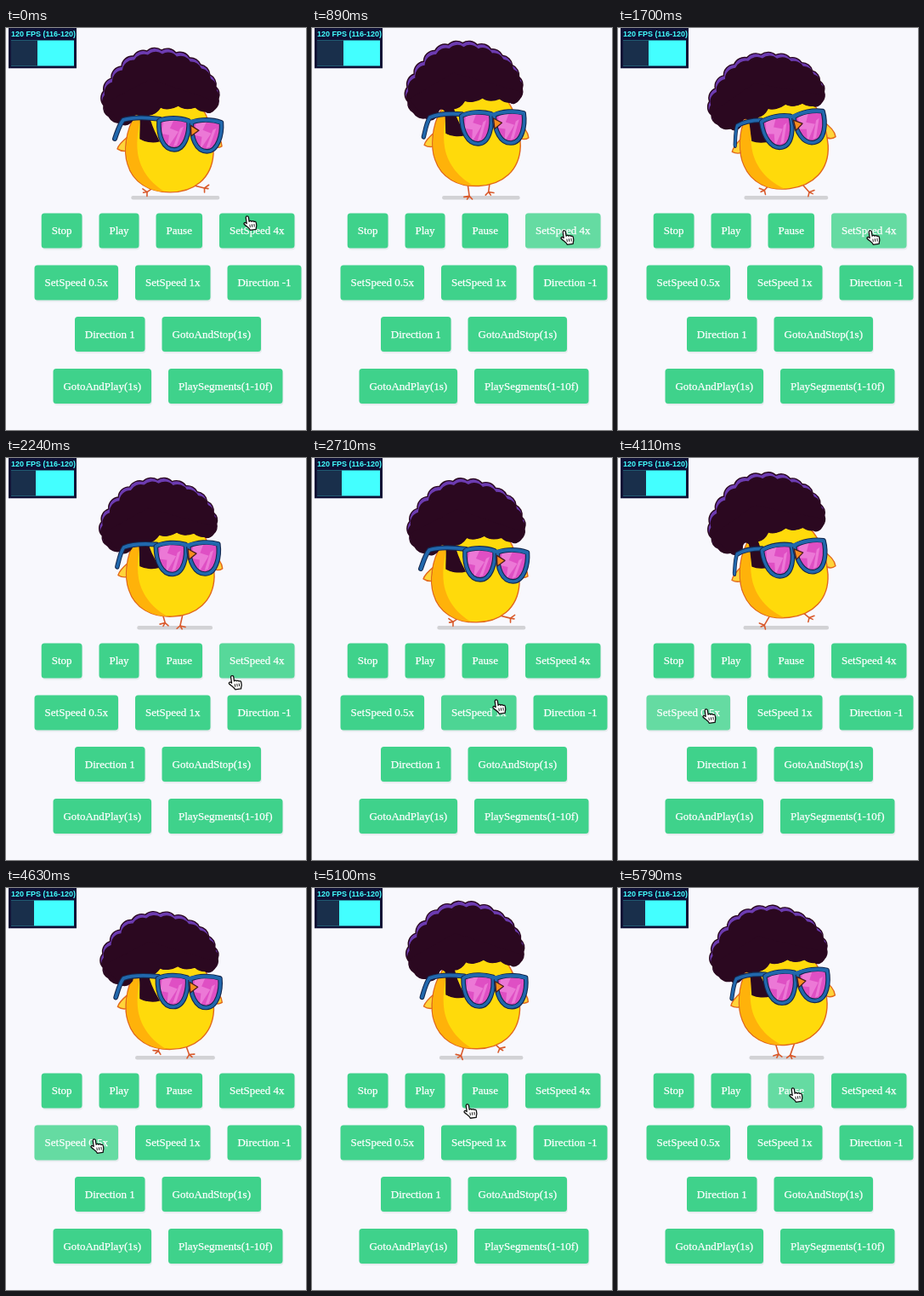
Write an HTML page that moves like this. It is 353x472 px and loops after 5.81 s.

```html
<!DOCTYPE html>
<html lang="en">
<head>
<meta charset="utf-8">
<title>Dancing chick player</title>
<style>
  html, body { margin: 0; width: 100%; height: 100%; overflow: hidden; background: #f8f8fd; }
  svg { display: block; }
  .button { font: 13px "Liberation Serif", "Times New Roman", serif; text-anchor: middle; fill: #fff; stroke: #fff; stroke-width: .25; }
  .fps { font: bold 9px "Liberation Sans", Arial, sans-serif; fill: #43ffff; }
  .skin { stroke: #e2681c; stroke-width: 1.4; stroke-linejoin: round; }
  .leg { fill: none; stroke: #d95a2c; stroke-width: 1.6; stroke-linecap: round; stroke-linejoin: round; }
  .rim { fill: none; stroke-linecap: round; stroke-linejoin: round; }
  .dark { stroke: #14284f; }
  .blue { stroke: #2168ad; }
</style>
</head>
<body>
<svg width="353" height="472" viewBox="0 0 353 472">
  <defs>
    <path id="lens" d="M180 109C190 105 204 105 215 109C216 123 211 143 198 143C185 143 179 127 180 109Z"/>
    <path id="armShape" d="M181 107C166 105 151 104 138 108C133 114 131 122 128 130"/>
    <path id="brow" d="M182 108C192 105 207 106 216 110C225 108 241 107 252 111"/>
    <path id="hairShape"/>
    <clipPath id="hairClip"><use href="#hairShape"/></clipPath>
    <clipPath id="lensClip"><use href="#lens"/></clipPath>
    <g id="lensFull">
      <use href="#lens" fill="#df4fc4"/>
      <g clip-path="url(#lensClip)" fill="#ec78d6">
        <path d="M186 105H199L193 118L203 122L190 141L192 126L183 124Z"/>
        <path d="M205 118L209 116L201 138L197 139Z"/>
      </g>
      <use href="#lens" class="rim dark" stroke-width="5.6"/>
      <use href="#lens" class="rim blue" stroke-width="3.4"/>
    </g>
  </defs>

  <rect x="3" y="-1" width="80" height="48.3" fill="#0e1035"/>
  <rect x="6" y="14.5" width="74" height="30" fill="#43ffff"/>
  <rect id="graph" x="6" y="14.5" height="30" fill="#192f4b"/>
  <text class="fps" x="6" y="9.5">120 FPS (116-120)</text>

  <rect id="shadow" y="197" height="4.4" rx="2" fill="#d2d2d5"/>
  <path id="legL" class="leg"/>
  <path id="legR" class="leg"/>
  <path id="footL" class="leg" d="M-6 2L0 0L-2 4M0 0L4 3"/>
  <path id="footR" class="leg" d="M6 2L0 0L2 4M0 0L-4 3"/>

  <g id="body">
    <g class="skin" fill="#ffd43a">
      <path d="M148 124C141 130 133 135 131 142C138 147 146 144 151 140Z"/>
      <path d="M240 118C247 124 254 132 254 139C249 142 244 140 240 136Z"/>
    </g>
    <path class="skin" fill="#ffda0b" d="M152 103C141 120 138 145 143 160C149 181 168 193 193 193C221 193 242 177 244 148C245 125 237 75 195 75C175 75 160 88 152 103Z"/>
    <path fill="#ffb20a" d="M153 103C142 120 139 145 144 160C150 180 168 192 187 192.300C171 183 158 167 155 147C153 130 156 116 159 103Z"/>
  </g>

  <g id="hair">
    <use href="#hairShape" fill="#6c3bb0"/>
    <g clip-path="url(#hairClip)" fill="#2b0820">
      <use href="#hairShape" x="1" y="4.5"/>
      <path d="M116 88L170 60L247 86L246 99L180 136L157 133L134 112Z"/>
    </g>
    <use href="#hairShape" fill="none" stroke="#2b0820" stroke-width="1.4"/>
  </g>

  <g id="glasses">
    <g id="arm">
      <use href="#armShape" class="rim dark" stroke-width="6"/>
      <use href="#armShape" class="rim blue" stroke-width="3.8"/>
    </g>
    <use href="#lensFull"/>
    <use href="#lensFull" x="38.5" y="2"/>
    <use href="#brow" class="rim blue" stroke-width="3.8"/>
    <path d="M217.500 114.500L227 120.500L218 127Z" fill="#f68d1f" stroke="#4a1c1c" stroke-width="1.300" stroke-linejoin="round"/>
  </g>

  <g id="buttons"></g>
  <g id="cursor" fill="#fff" stroke="#111" stroke-width="1.3" stroke-linejoin="round">
    <path d="M-2 1.500a1.600 1.600 0 0 1 3.200 0V6.500c.8-1 2.600-.8 2.900.4.9-.8 2.500-.4 2.700.7 1-.5 2.400 0 2.400 1.500v3c0 1.500-1 2-1.200 4.500H1C.5 14-2 12.500-5 9c-.8-1.200.7-2.600 2-1.600l1 1z"/>
    <path d="M1.500 10v3.500M4 10v3.500M6.500 10v3.500" stroke-width=".9"/>
  </g>
</svg>
<script>
const LOOP = 5810;
const $ = id => document.getElementById(id);
const set = (id, name, value) => $(id).setAttribute(name, value);
const wave = turns => Math.cos(2 * Math.PI * turns);
const clamp = v => Math.max(0, Math.min(1, v));

// label, x, y, width, hover start, hover end
const buttons = [
  ["Stop", 41.7, 217.5, 47.8], ["Play", 109.5, 217.5, 47],
  ["Pause", 176.5, 217.5, 54.5, 5150, 9999], ["SetSpeed 4x", 251, 217.5, 88.5, 60, 2150],
  ["SetSpeed 0.5x", 33.5, 278.5, 98.5, 3520, 4870], ["SetSpeed 1x", 152, 278.5, 88.5, 2600, 3320],
  ["Direction -1", 260.5, 278.5, 87],
  ["Direction 1", 81, 339, 82.5], ["GotoAndStop(1s)", 183.5, 339, 116.5],
  ["GotoAndPlay(1s)", 55.5, 400, 115.5], ["PlaySegments(1-10f)", 191, 400, 134.5]
];
$("buttons").innerHTML = buttons.map(([label, x, y, w], i) => `
  <rect x="${x + 1}" y="${y + 2}" width="${w}" height="41" rx="4" fill="#e8ebef"/>
  <rect x="${x}" y="${y}" width="${w}" height="41" rx="3.5" fill="#3fd28b"/>
  <rect id="glow${i}" x="${x}" y="${y}" width="${w}" height="41" rx="3.5" fill="#fff"/>
  <text class="button" x="${x + w / 2}" y="${y + 24.5}">${label}</text>`).join("");

const curls = [[121, 104], [115, 91], [115, 74], [124, 59], [136, 45], [150, 33], [166, 27],
  [183, 26], [200, 29], [216, 35], [229, 43], [240, 55], [247, 69], [250, 83], [246, 95]];
set("hairShape", "d", "M135 111" + curls.map(p => `A13 13 0 0 1 ${p}`).join("") +
  "C243 99 238 101 235 98C231 98 226 96 223 93C214 96 208 95 203 91C196 95 187 96 182 93C178 99 173 102 168 102" +
  "C170 115 176 125 180 133C172 135 163 133 158 130C158 118 159 110 158 104" +
  "C154 99 150 101 149 108C144 115 138 115 135 111Z");

// [time, ...values] keys, linear in between
const dance = [[0, -.01], [890, 1.17], [1700, 3.4], [2710, 5.985], [4110, 7.577],
  [5100, 8.1], [5560, 8.22], [5790, 8.25], [LOOP, 8.25]];
const pointer = [[0, 284, 221], [60, 284, 221], [400, 297, 238], [1950, 297, 238],
  [2710, 217, 284], [2900, 212, 291], [3250, 212, 291], [3650, 104, 295],
  [4780, 104, 295], [5100, 183, 254], [5650, 206, 235], [LOOP, 206, 235]];
function sample(keys, t) {
  const i = Math.max(1, keys.findIndex(k => k[0] > t));
  const a = keys[i - 1], b = keys[i], f = (t - a[0]) / (b[0] - a[0]);
  return a.slice(1).map((v, n) => v + (b[n + 1] - v) * f);
}

function pose(phase) {
  const p = -phase;
  const lean = 1 - wave(p - .03);
  const tilt = -6 * lean;
  const dy = -3.5 + 3.5 * wave(2 * (p - .03)) - 1.5 * lean;
  const bob = -2 + 7 * wave(2 * (p - .11));
  const base = (dy + bob) / 2;
  const bodyX = 1.5 * lean;
  set("body", "transform", `translate(${bodyX} ${dy}) rotate(${tilt * .6} 193 142)`);
  set("glasses", "transform", `translate(${-.8 * lean} ${dy + .8 * lean}) rotate(${tilt} 194 160)`);
  set("arm", "transform", `translate(181) scale(${1 - .16 * lean} 1) translate(-181)`);
  set("hair", "transform", `translate(${182 - 2 * lean} ${105 + base}) rotate(${tilt * .73})
    scale(1 ${(83 + base - bob) / 83}) translate(-182 -105)`);

  const spread = wave(2 * (p - .01));
  const feet = [
    ["L", 181, 177.5 - 11.5 * spread, 194 - 3.5 * wave(2 * (p - .1)), 1],
    ["R", 209, 218 + 15.5 * spread, 192 - 5 * wave(2 * (p - .96)), -1]
  ];
  for (const [side, hip, x, y, turn] of feet) {
    set("leg" + side, "d", `M${hip + bodyX} ${182 + dy}L${x} ${y}`);
    set("foot" + side, "transform", `translate(${x} ${y}) rotate(${turn * 27 * (1 + spread)})`);
  }
  const half = 48 + 4 * wave(2 * p);
  set("shadow", "x", 198.5 + .8 * wave(p) - half);
  set("shadow", "width", 2 * half);
}

const start = performance.now();
function draw() {
  const t = (performance.now() - start) % LOOP;
  pose(sample(dance, t)[0]);
  set("graph", "width", 31 - Math.floor((t + 20) / 1000));
  buttons.forEach(([, , , , on = LOOP, off = LOOP], i) =>
    set("glow" + i, "opacity", .2 * Math.min(clamp((t - on) / 300), 1 - clamp((t - off) / 250))));
  set("cursor", "transform", `translate(${sample(pointer, t).join(" ")}) rotate(-8)`);
  requestAnimationFrame(draw);
}
draw();
</script>
</body>
</html>
```
